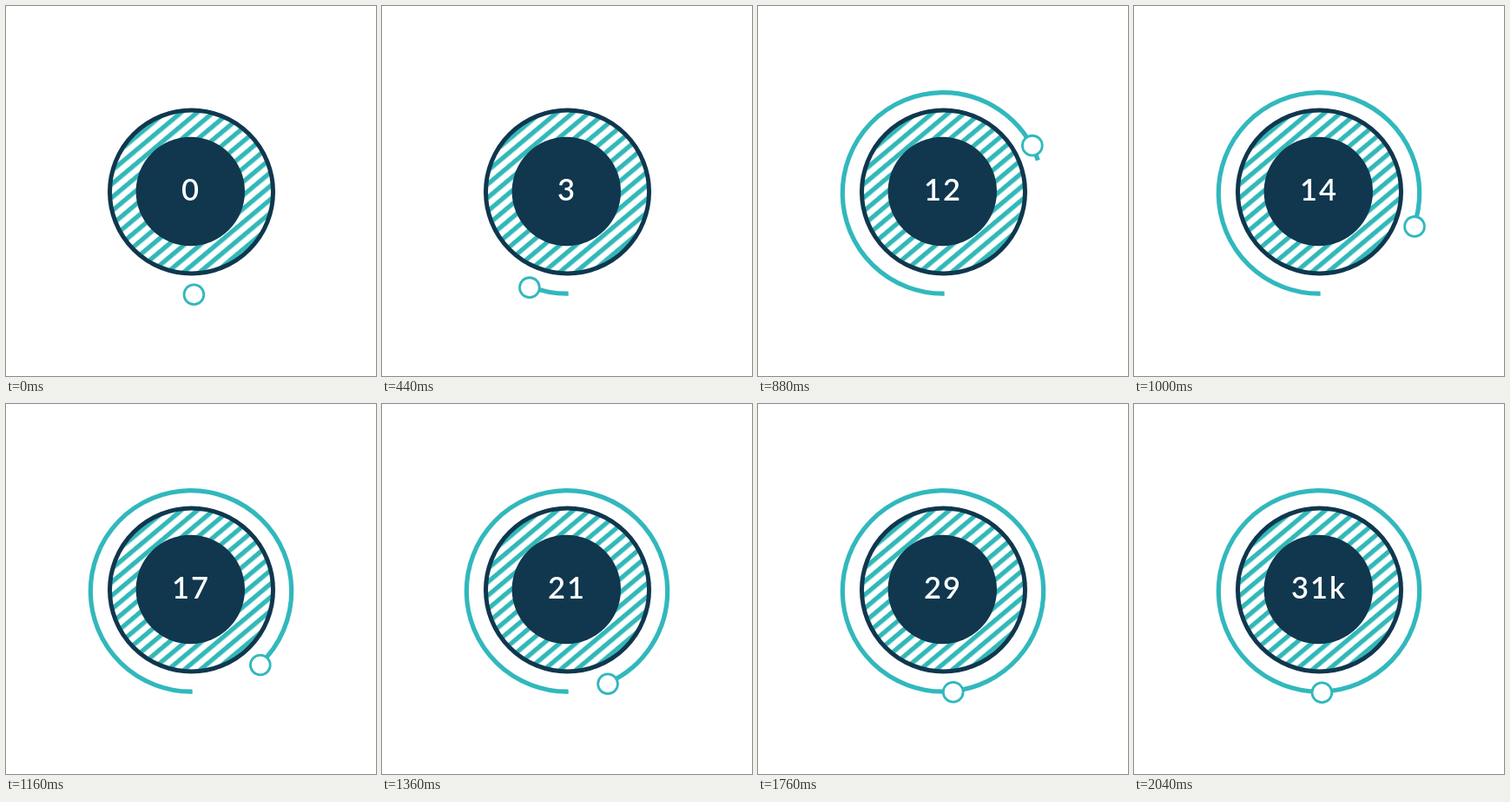
An HTML page for the animation above (2560 ms loop, 426x426 px).

```html
<!DOCTYPE html>
<html lang="en">
<head>
<meta charset="utf-8">
<title>Counter dial</title>
<style>
  html, body { margin: 0; width: 100%; height: 100%; overflow: hidden; background: #fff; }
  svg { display: block; width: 100%; height: 100%; }
  text { font: 600 34.5px Lato, sans-serif; letter-spacing: 2px; text-anchor: middle; }
</style>
</head>
<body>
<svg viewBox="0 0 426 426">
  <defs>
    <pattern id="stripes" width="11.9" height="11.9" patternUnits="userSpaceOnUse"
             patternTransform="translate(213.5 214) rotate(-40)">
      <rect y="3" width="11.9" height="5.3" fill="#31b8b9"/>
    </pattern>
  </defs>
  <circle cx="213.5" cy="214" r="94" fill="url(#stripes)" stroke="#10374e" stroke-width="5"/>
  <circle cx="212.3" cy="213.5" r="62.7" fill="#10374e"/>
  <text id="count" x="213" y="224" fill="#fff">0</text>
  <circle id="trail" cx="213" cy="215.4" r="115.7" pathLength="360" transform="rotate(89.2 213 215.4)"
          fill="none" stroke="#31b8bd" stroke-width="5.2" stroke-dasharray="0 400"/>
  <circle id="knob" r="11.4" fill="#fff" stroke="#31b8bd" stroke-width="2.8"/>
</svg>
<script>
const LOOP = 2560, STEP = 40, START = 280, END = 1880, TOTAL = 31;
const [count, trail, knob] = ['count', 'trail', 'knob'].map(id => document.getElementById(id));

// Knob angle in degrees, clockwise from the bottom: [ms, angle]
const keys = [[START, -1.8], [440, 21.5], [840, 217], [880, 242],
              [1160, 316.7], [1360, 336.1], [1760, 354.1], [END, 358.2]];
const slope = i => (keys[i + 1][1] - keys[i][1]) / (keys[i + 1][0] - keys[i][0]);

function tangent(i) {
  if (i === 0 || i === keys.length - 1) return 0;
  const before = keys[i][0] - keys[i - 1][0], after = keys[i + 1][0] - keys[i][0];
  return (slope(i - 1) * after + slope(i) * before) / (before + after);
}

// Cubic Hermite curve through the keys
function angleAt(t) {
  const i = Math.max(0, keys.findIndex(k => k[0] >= t) - 1);
  const [t0, a0] = keys[i], [t1, a1] = keys[i + 1];
  const h = t1 - t0, u = (t - t0) / h, v = 1 - u;
  return v * v * (1 + 2 * u) * a0 + u * u * (3 - 2 * u) * a1
    + h * u * v * (v * tangent(i) - u * tangent(i + 1));
}

function draw(now) {
  const time = Math.floor(now % LOOP / STEP) * STEP;
  const t = Math.min(END, time < START + STEP ? START : time);
  const angle = angleAt(t), rad = angle * Math.PI / 180;
  knob.setAttribute('cx', 212.7 - 116.8 * Math.sin(rad));
  knob.setAttribute('cy', 215.5 + 116.8 * Math.cos(rad));

  // The trail briefly runs ahead of the knob
  const lead = 13 * Math.exp(-(((t - 800) / 130) ** 2));
  trail.setAttribute('stroke-dasharray', `${Math.max(0, angle + 0.8 + lead)} 400`);

  count.textContent = Math.round(TOTAL * (t - START) / (END - START)) + (t === END ? 'k' : '');
}

const origin = performance.now();
function tick() {
  draw(performance.now() - origin);
  requestAnimationFrame(tick);
}
tick();
</script>
</body>
</html>
```
